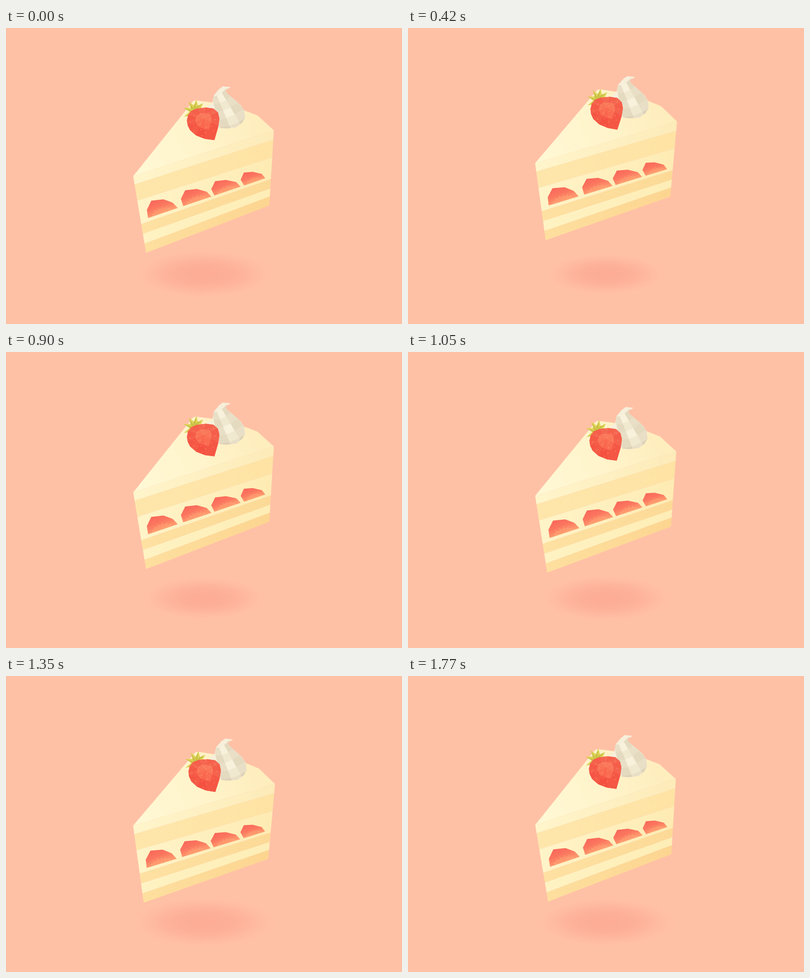
An HTML page with a canvas for the animation above (1800 ms loop, 800 by 600 pixels).

```html
<!DOCTYPE html>
<html lang="en">
<head>
<meta charset="utf-8">
<title>Floating shortcake</title>
<style>
html, body { margin: 0; width: 100%; height: 100%; overflow: hidden; background: #ffc1a6; }
canvas { display: block; width: 800px; height: 600px; }
</style>
</head>
<body>
<canvas id="stage" width="800" height="600"></canvas>
<script>
const ctx = document.getElementById('stage').getContext('2d');
const LOOP = 1800, TAU = Math.PI * 2;
const BG = '#ffc1a6';

const lerp = (a, b, u) => a + (b - a) * u;
const between = (p, q, u) => [lerp(p[0], q[0], u), lerp(p[1], q[1], u)];

function trace(pts) {
  ctx.beginPath();
  pts.forEach(p => ctx.lineTo(...p));
  ctx.closePath();
}

// The hairline stroke hides seams between neighbouring facets
function poly(pts, fill, seam = 0) {
  trace(pts);
  ctx.fillStyle = ctx.strokeStyle = fill;
  ctx.fill();
  if (seam) {
    ctx.lineWidth = seam;
    ctx.stroke();
  }
}

function blend(x0, y0, x1, y1, ...colors) {
  const g = ctx.createLinearGradient(x0, y0, x1, y1);
  colors.forEach((c, i) => g.addColorStop(i / (colors.length - 1), c));
  return g;
}

function seeded(seed) {
  return () => (seed = (seed * 16807) % 2147483647) / 2147483647;
}

function dot(x, y, rx, ry = rx) {
  ctx.beginPath();
  ctx.ellipse(x, y, rx, ry, 0, 0, TAU);
  ctx.fill();
}

// Front face: its four corners, and where the layers cut its left and right sides
const TL = [257, 300], TR = [541, 207], BL = [283, 455.5], BR = [532, 359.5];
const cuts = [[0, 0], [.11, .125], [.32, .36], [.625, .65], [.752, .774], [.881, .88], [1, 1]];
const layers = [
  ['#fff5cb', '#fdebb9'],
  ['#fee6ab', '#fee3a4'],
  ['#fff4c9', '#feebb3'],
  ['#fee2a3', '#fcd996'],
  ['#fff3c4', '#feedb5'],
  ['#fee0a0', '#fcd590']
];
const cutAt = (i, u) => between(between(TL, BL, cuts[i][0]), between(TR, BR, cuts[i][1]), u);

function drawLayer(colors, i) {
  poly([cutAt(i, 0), cutAt(i, 1), cutAt(i + 1, 1), cutAt(i + 1, 0)], blend(260, 0, 540, 0, ...colors));
  if (i % 2 === 0) return;
  const rnd = seeded(91 + i * 37);
  ctx.fillStyle = 'rgba(240,195,120,.3)';
  for (let k = 0; k < 50; k++) {
    const u = .02 + rnd() * .96;
    dot(...between(cutAt(i, u), cutAt(i + 1, u), .12 + rnd() * .76), .5 + rnd() * .3);
  }
}

// Half berries stand on one sloping line and shrink to the right
function drawSlice([x, w], i) {
  const h = 33 - i * 2.2, lean = i * .04;
  const at = (u, v) => [x + u * w, 385 - (x + u * w - 287) * .341 - v * h];
  ctx.save();
  trace([at(0, 0), at(-.04 - lean, .53), at(.11 - lean, 1), at(.52 - lean, .83), at(.83, .43), at(1, 0)]);
  ctx.fillStyle = blend(...at(.3, 1), ...at(.5, 0), '#f9675a', '#fb775f', '#ff9b6f');
  ctx.fill();
  ctx.clip();
  ctx.translate(...at(.48, 0));
  ctx.rotate(-.32);
  ctx.scale(w / 60, h / 33);
  ctx.fillStyle = 'rgba(255,170,118,.3)';
  dot(0, 4, 24, 14);
  ctx.strokeStyle = 'rgba(255,184,140,.5)';
  ctx.lineWidth = 1;
  for (let a = -2.6; a < -.5; a += .4) {
    ctx.beginPath();
    ctx.moveTo(Math.cos(a) * 18, 4 + Math.sin(a) * 11);
    ctx.lineTo(Math.cos(a) * 24, 4 + Math.sin(a) * 18);
    ctx.stroke();
  }
  ctx.restore();
}

const creamEdge = [
  [438, 118], [454, 119.5], [443, 126], [446, 132], [464, 147], [474, 156], [481, 167], [483, 181],
  [477, 192], [465, 201], [446, 203.5], [428, 202], [418, 163], [405, 161], [417, 151], [420, 136], [430, 124]
];

// Facets lie on ridges that sweep down from right to left
function drawCream() {
  const shades = ['#f8f1dc', '#e4dac0', '#f1e8d0', '#e9dfc7', '#ddd2b7'];
  const ridge = (j, s) => {
    const u = s / 3;
    return [lerp(446 + j * 11, 416 + j * 4, u), lerp(122 + j * 14, 138 + j * 16, u) + Math.sin(u * Math.PI) * 5];
  };
  poly(creamEdge, '#f6efda');
  ctx.save();
  trace(creamEdge);
  ctx.clip();
  for (let j = 0; j < 5; j++) for (let s = 0; s < 3; s++) {
    const shade = shades[j > 3 ? 4 - s % 2 : (j * 2 + s * 3 + 1) % 4];
    poly([ridge(j, s), ridge(j, s + 1), ridge(j + 1, s + 1), ridge(j + 1, s)], shade, .6);
  }
  ctx.restore();
}

function drawLeaves() {
  for (let k = 0; k < 5; k++) {
    const a = (154 + k * 40) * TAU / 360, len = 25 - k;
    const on = (r, side) => [383 + Math.cos(a) * r - Math.sin(a) * side, 168 + Math.sin(a) * r + Math.cos(a) * side];
    poly([on(-4, 0), on(8, -5), on(len, 0)], '#c9c045', .5);
    poly([on(-4, 0), on(8, 5), on(len, 0)], '#dfd557', .5);
  }
}

const berryEdge = [
  [365.5, 187], [368, 176], [374, 168], [386, 163], [404, 161], [419, 163], [428, 171],
  [431, 183], [429, 199], [421, 227], [402, 224.5], [384, 217.5], [372, 207], [367, 197]
];

// Each edge fans into an outer and an inner facet, lit from above
function drawBerry() {
  const mid = [399, 184], n = berryEdge.length;
  poly(berryEdge, '#f85a48');
  berryEdge.forEach((p, i) => {
    const q = berryEdge[(i + 1) % n];
    const glow = (mid[1] - p[1]) / 4 + (i % 2) * 7;
    const tone = k => `rgb(${245 + k * 5},${91 + glow + k * 22},${72 + glow * .7 + k * 14})`;
    const a = between(p, mid, .5), b = between(q, mid, .5);
    poly([p, q, b, a], tone(0));
    poly([a, b, mid], tone(1), .5);
  });
  const rnd = seeded(407);
  ctx.fillStyle = 'rgba(255,180,125,.75)';
  for (let k = 0; k < 20; k++) {
    const r = 29 * Math.sqrt((k + .5) / 20), a = k * 2.4 + rnd() * .3;
    dot(399 + Math.cos(a) * r, 190 + Math.sin(a) * r, .7, 1);
  }
}

function drawCake() {
  const top = [TL, [378, 148], [383, 146.5], [419, 151], [482, 167], [508, 177], TR];
  poly(top, blend(275, 290, 510, 180, '#fff8d4', '#fff4cb', '#feedbd'));
  layers.forEach(drawLayer);
  [[287, 60], [358, 57], [421, 53], [481, 43]].forEach(drawSlice);
  drawCream();
  drawLeaves();
  drawBerry();
}

function drawShadow(lift) {
  const s = 1 + lift * .0065;
  ctx.save();
  ctx.translate(400, 499);
  ctx.scale(142 * s, 50 * s);
  const g = ctx.createRadialGradient(0, 0, 0, 0, 0, 1);
  for (let r = 0; r <= 1; r += .125) {
    const fade = (1 + Math.cos(Math.PI * r ** 1.5)) / 2;
    g.addColorStop(r, `rgba(253,173,150,${fade})`);
  }
  ctx.fillStyle = g;
  ctx.fillRect(-1, -1, 2, 2);
  ctx.restore();
}

// One bob and two tilts per loop
function draw(t) {
  const lift = -7.6 - 17 * Math.cos(TAU * (t - 588) / LOOP);
  const tilt = .015 * (1 - Math.cos(TAU * (t + 32) / (LOOP / 2)));
  ctx.fillStyle = BG;
  ctx.fillRect(0, 0, 800, 600);
  drawShadow(lift);
  ctx.save();
  ctx.translate(400, 290 + lift);
  ctx.rotate(tilt);
  ctx.translate(-400, -290);
  drawCake();
  ctx.restore();
}

const start = performance.now();
function tick() {
  const t = (performance.now() - start) % LOOP;
  draw(Math.floor(t / 30) * 30);
  requestAnimationFrame(tick);
}
tick();
</script>
</body>
</html>
```
